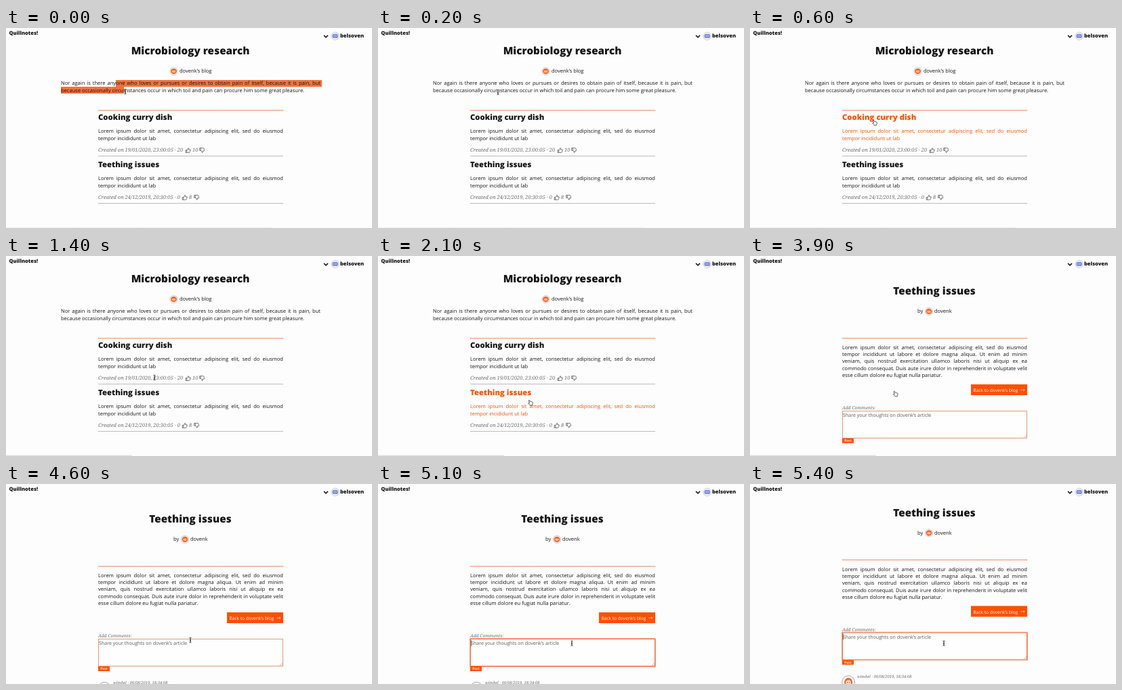
These frames come from a looping animation (540x296 px, 5.5 s). An HTML page:

```html
<!DOCTYPE html>
<html lang="en">
<head>
<meta charset="utf-8">
<title>Blog walkthrough</title>
<style>
  html, body { margin: 0; width: 100%; height: 100%; overflow: hidden; background: #fdfdfd; }
  #stage {
    position: absolute; left: 0; top: 0; width: 540px; height: 296px; overflow: hidden;
    font-family: "Open Sans", "Noto Sans", sans-serif; color: #161616;
    text-rendering: geometricPrecision; cursor: default;
  }
  #stage div, #stage svg { position: absolute; }
  .layer, #stage svg { left: 0; top: 0; width: 540px; height: 296px; overflow: visible; }
  .text { white-space: nowrap; }
  .full { text-align: justify; text-align-last: justify; white-space: normal; }
  .mid { text-align: center; }
  .serif { font-family: "Noto Serif", "Liberation Serif", serif; font-style: italic; color: #6c6c6c; }
  .rule { left: 136px; width: 273px; height: 1px; background: #bcbcbc; }
  .hot .text { color: #f4530c; }
  .fill { background: #ff5000; }
  .select { background: #f4713c; }
  #field { left: 136px; top: 229px; width: 273px; height: 41px; box-sizing: border-box; border: 1px solid #e59a74; background: #fefefe; }
  #field.focus { border-color: #f0703a; box-shadow: 0 0 0 .6px #f0703a; }
  #status { left: 0; bottom: 0; height: 2px; }
</style>
</head>
<body>
<div id="stage"></div>
<script>
const LOOP = 5500;
const ORANGE = '#f26a2e';
const stage = document.getElementById('stage');

function box(parent, cls = '', style = {}) {
  const div = document.createElement('div');
  div.className = cls;
  for (const key in style) {
    const value = style[key];
    div.style[key] = typeof value === 'number' ? value + 'px' : value;
  }
  parent.appendChild(div);
  return div;
}

// y is the middle of the lowercase letters
function text(parent, x, y, str, { size = 7.55, weight = 400, cls = '', width, color } = {}) {
  const lead = size * 1.4;
  const top = y + 0.6 - lead / 2;
  const div = box(parent, 'text ' + cls, { left: x, top, fontSize: size, lineHeight: lead + 'px' });
  div.style.fontWeight = weight;
  if (width) div.style.width = width + 'px';
  if (color) div.style.color = color;
  div.textContent = str;
  return div;
}

function lines(parent, x, y, width, step, list) {
  list.forEach((str, i) => {
    const last = i === list.length - 1;
    text(parent, x, y + i * step, str, last ? {} : { cls: 'full', width });
  });
}

function draw(parent, markup) {
  const svg = document.createElementNS('http://www.w3.org/2000/svg', 'svg');
  svg.setAttribute('viewBox', '0 0 540 296');
  svg.innerHTML = markup;
  parent.appendChild(svg);
  return svg;
}

const title = (parent, y, str) => text(parent, 2, y, str, { size: 15.25, weight: 800, cls: 'mid', width: 540 });

const dots = `<path d="M136 121.9H409" stroke="#f2591a" stroke-width="1.2" stroke-dasharray="1.2 .8"/>`;

const face = (x, y) => `<g transform="translate(${x} ${y})">
  <circle r="5.7" fill="#fff" stroke="#bdbdbd" stroke-width=".8"/>
  <ellipse rx="4.5" ry="4.2" fill="${ORANGE}"/>
  <rect x="-2.6" y="-.9" width="5.2" height="2.6" rx="1.2" fill="#fbd9c4"/>
  <path d="M-1.6 .4h.9M.7 .4h.9" stroke="#a5502a" stroke-width=".8"/></g>`;

const thumb = (x, y, flip = 1) => `<g transform="translate(${x} ${y}) scale(1 ${flip})"
  fill="none" stroke="#555" stroke-width=".8" stroke-linejoin="round">
  <path d="M-3.6-.4h1.6v3.8h-1.6zM-2 0L-.5-1.8Q-.2-3.6.5-3.5Q1.5-3.2.9-1H3Q3.9-.5 3.2.6L2.7 2.5Q2.4 3.4 1.6 3.4H-2"/></g>`;

// Blog overview
const blog = box(stage, 'layer');
const marks = [[162, 77, 304, 10], [81, 87, 93, 10]].map(([left, top, width, height]) =>
  box(blog, 'select', { left, top, width, height }));
title(blog, 34.2, 'Microbiology research');
text(blog, 256, 63.8, 'dovenk\u2019s blog');
lines(blog, 81, 82, 383, 10.4, [
  'Nor again is there anyone who loves or pursues or desires to obtain pain of itself, because it is pain, but',
  'because occasionally circumstances occur in which toil and pain can procure him some great pleasure.'
]);

function post(dy, name, date, up, upX, down, downX) {
  const link = box(blog, 'layer');
  text(link, 136, 132.4 + dy, name, { size: 11.35, weight: 800 });
  lines(link, 136, 153 + dy, 273, 10.4, [
    'Lorem ipsum dolor sit amet, consectetur adipiscing elit, sed do eiusmod',
    'tempor incididunt ut lab'
  ]);
  const y = 181 + dy;
  const meta = { size: 7.5, cls: 'serif' };
  text(blog, 136, y, `Created on ${date} · ${up}`, meta);
  text(blog, upX + 2.2, y, `· ${down}`, meta);
  box(blog, 'rule', { top: Math.round(189 + dy) });
  draw(blog, thumb(upX, y) + thumb(downX, y, -1));
  return link;
}
const posts = [
  post(0, 'Cooking curry dish', '19/01/2020, 23:00:05', 20, 268.7, 10, 289.3),
  post(69.8, 'Teething issues', '24/12/2019, 20:30:05', 0, 263.8, 8, 281.3)
];
draw(blog, dots + face(247.5, 64));

// Article
const article = box(stage, 'layer');
title(article, 52.2, 'Teething issues');
text(article, 247, 82, 'by');
text(article, 272, 82, 'dovenk');
lines(article, 136, 135.2, 273, 10.45, [
  'Lorem ipsum dolor sit amet, consectetur adipiscing elit, sed do eiusmod',
  'tempor incididunt ut labore et dolore magna aliqua. Ut enim ad minim',
  'veniam, quis nostrud exercitation ullamco laboris nisi ut aliquip ex ea',
  'commodo consequat. Duis aute irure dolor in reprehenderit in voluptate velit',
  'esse cillum dolore eu fugiat nulla pariatur.'
]);
box(article, 'fill', { left: 326, top: 190, width: 83, height: 16 });
text(article, 329.5, 198, 'Back to dovenk\u2019s blog', { size: 6.6, color: '#fff' });
text(article, 136, 224.6, 'Add Comments:', { size: 6.8, cls: 'serif' });
const field = box(article);
field.id = 'field';
text(article, 137, 236.1, 'Share your thoughts on dovenk\u2019s article', { size: 7.1, color: '#5c5c5c' });
const caret = box(article, '', { left: 137, top: 231, width: 1, height: 9, background: '#777' });
box(article, 'fill', { left: 136, top: 270, width: 17, height: 7 });
text(article, 136, 273.4, 'Post', { size: 5, weight: 600, color: '#fff', width: 17, cls: 'mid' });
draw(article, dots + face(264, 82) + `
  <path d="M399.3 198.2h5.7M403.3 196.6l1.7 1.6l-1.7 1.6" fill="none" stroke="#fff" stroke-width=".7"/>
  <path d="M404 268.5l4-4M406.3 268.5l1.7-1.7" stroke="#888" stroke-width=".6"/>`);

const comment = box(article, 'layer');
text(comment, 158, 294, 'wimbel · 06/08/2019, 18:34:08', { size: 5.9, cls: 'serif' });
text(comment, 158, 307.2, 'Totally agree, loved it! This is the', { size: 6.6 });
draw(comment, `<circle cx="145.2" cy="302.7" r="9.4" fill="#fff" stroke="#909090" stroke-width=".8"/>
  <ellipse cx="145.2" cy="303" rx="6" ry="6.8" fill="${ORANGE}"/>
  <ellipse cx="145.2" cy="303.8" rx="3.9" ry="4" fill="#fbd9c4"/>
  <path d="M143 303.2h1.2M146.2 303.2h1.2" stroke="#7a4630" stroke-width="1"/>`);

// Fixed header, status strip and pointer
text(stage, 4.5, 7.4, 'Quillnotes!', { weight: 800 });
text(stage, 493, 11.8, 'belsoven', { weight: 800 });
draw(stage, `<path d="M469 10.9l3 3l3-3" fill="none" stroke="#222" stroke-width="1.7"/>
  <circle cx="485.7" cy="12" r="5.8" fill="#f4f5fc" stroke="#bfc3d6" stroke-width=".8"/>
  <rect x="481.4" y="8.8" width="8.6" height="6.2" rx="2.6" fill="#8593d6"/>
  <path d="M483.5 11.8h4.4" stroke="#b9c1ea" stroke-width="1"/>`);
const status = box(stage);
status.id = 'status';

const beam = 'M-1.6-3.8Q0-3.8 0-2.8V2.8Q0 3.8-1.6 3.8M1.6-3.8Q0-3.8 0-2.8V2.8Q0 3.8 1.6 3.8';
const shapes = {
  beam: `<g fill="none"><path d="${beam}" stroke="#fff" stroke-width="1.5"/>
    <path d="${beam}M-.9 .8h1.8" stroke="#333" stroke-width=".8"/></g>`,
  hand: `<path d="M-2.7-3.2Q-2.1-4.2-1.3-3.2L-.3-1.4Q.5-2 1-1.3Q1.8-1.7 2.2-.9Q3.2-1 3.4.1Q3.6 1.8 2.8 2.8V3.9H-.8Q-1.4 2.8-2.9 1.6Q-3.5.6-2.6.4Q-2 .4-1.4.8Z"
    fill="#fff" stroke="#333" stroke-width=".8" stroke-linejoin="round"/>`,
  arrow: `<path d="M-2.5-4V3.4L-.8 1.9L.3 4.3L1.6 3.7L.6 1.4H2.8Z" fill="#111" stroke="#fff" stroke-width=".6"/>`
};
const pointer = draw(stage, Object.entries(shapes).map(([k, m]) => `<g data-kind="${k}">${m}</g>`).join(''));
const kinds = [...pointer.children];

// time, x, y, shape
const moves = [
  [0, 176, 94, 'beam'], [200, 177, 95, 'beam'], [500, 181, 114, 'arrow'],
  [600, 184, 140, 'hand'], [700, 186, 142, 'hand'], [1000, 189, 143, 'hand'],
  [1100, 198, 150, 'hand'], [1200, 207, 162, 'hand'], [1300, 214, 173, 'beam'],
  [1400, 219, 180, 'beam'], [1600, 220, 184, 'beam'], [1700, 222, 192, 'arrow'],
  [1800, 223, 202, 'hand'], [1900, 224, 210, 'hand'], [2000, 225, 215, 'hand'],
  [2100, 225, 217, 'hand'], [2300, 222, 213, 'hand'], [2400, 219, 209, 'hand'],
  [2500, 216, 206, 'hand'], [2600, 214.7, 203.7, 'hand'], [4400, 226, 210, 'arrow'],
  [4500, 248, 219, 'arrow'], [4600, 272, 231, 'beam'], [4700, 292, 235, 'beam'],
  [4800, 301, 238, 'beam'], [5000, 294, 237, 'beam'], [5100, 286, 235.7, 'beam']
];

const show = (el, on) => { el.style.visibility = on ? 'visible' : 'hidden'; };
const within = (t, from, to) => t >= from && t < to;

function render(t) {
  const reading = t >= 3900;
  blog.style.display = reading ? 'none' : '';
  article.style.display = reading ? '' : 'none';

  marks.forEach(m => show(m, t < 100));
  posts[0].classList.toggle('hot', within(t, 600, 1300));
  posts[1].classList.toggle('hot', within(t, 1800, 3900));

  const focus = t >= 5000;
  field.classList.toggle('focus', focus);
  caret.style.display = focus ? '' : 'none';
  comment.style.display = t >= 4500 ? '' : 'none';
  article.style.transform = t >= 5400 ? 'translateY(-9.5px)' : 'none';

  const early = t < 1300;
  show(status, t < 4500);
  status.style.width = early ? '392px' : '186px';
  status.style.background = `linear-gradient(transparent, ${early ? '#efefef' : '#d8d8d8'})`;

  const [, x, y, kind] = moves.findLast(m => m[0] <= t);
  pointer.style.transform = `translate(${x}px, ${y}px)`;
  kinds.forEach(k => { k.style.display = k.dataset.kind === kind ? '' : 'none'; });
}

const start = performance.now();
function tick() {
  render((performance.now() - start) % LOOP);
  requestAnimationFrame(tick);
}
tick();
</script>
</body>
</html>
```
